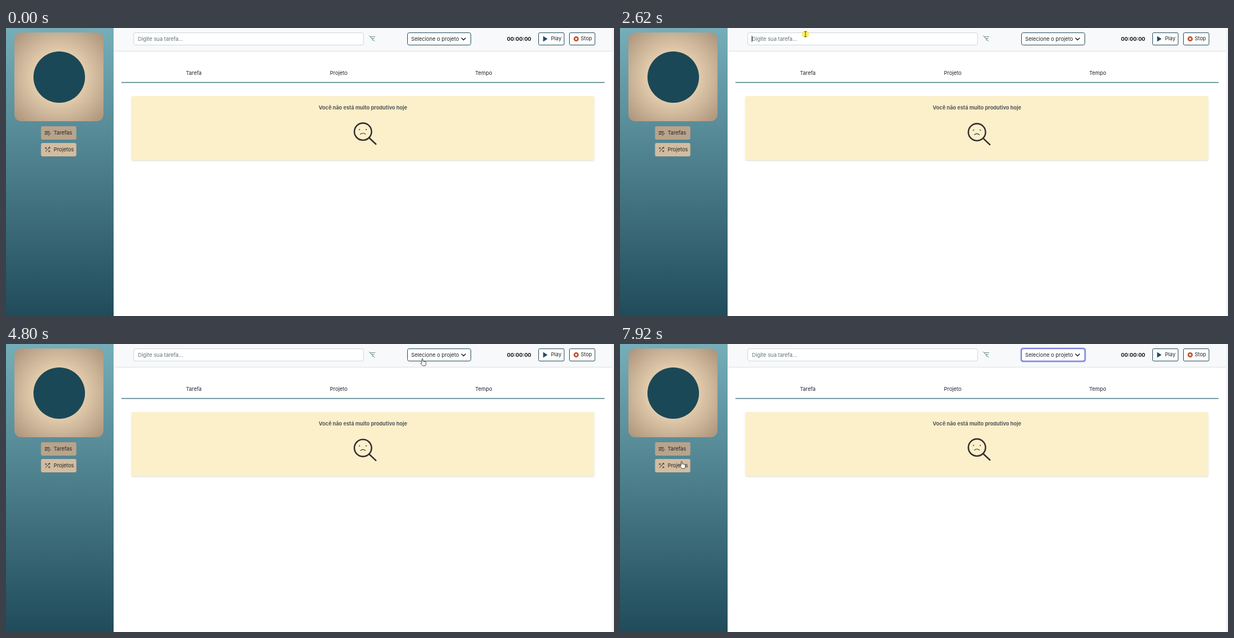
Write an HTML page that moves like this. It is 1085x516 px and loops after 7.99 s.

```html
<!DOCTYPE html>
<html lang="pt">
<head>
<meta charset="utf-8">
<style>
html, body { margin: 0; width: 100%; height: 100%; overflow: hidden; background: #fff; }
svg { display: block; width: 1085px; height: 516px; }
text { font: 9.4px Inter, sans-serif; fill: #212529; }
.mid { text-anchor: middle; }
.bold { font-size: 9.2px; font-weight: 700; }
.line { fill: none; stroke: #212529; stroke-linecap: round; stroke-linejoin: round; }
.box { fill: #fff; stroke: #1f4857; }
.ring { fill: none; stroke-width: 2.4; }
.edge { fill: none; }
#pointer path { fill: #fff; stroke: #333; stroke-width: .9; }
</style>
</head>
<body>
<svg viewBox="0 0 1085 516">
  <defs>
    <linearGradient id="sea" x2="0" y2="1">
      <stop stop-color="#75aeb9"/><stop offset="1" stop-color="#204b5b"/>
    </linearGradient>
    <radialGradient id="sand" r=".7">
      <stop offset=".3" stop-color="#ecd6b5"/><stop offset="1" stop-color="#ab937b"/>
    </radialGradient>
    <filter id="soft" x="-5%" y="-20%" width="110%" height="150%">
      <feDropShadow dx="0" dy="1" stdDeviation="1" flood-opacity=".16"/>
    </filter>
  </defs>

  <!-- page -->
  <rect x="192" width="890" height="40.5" fill="#f8f9fa" filter="url(#soft)"/>
  <rect x="1082" width="3" height="516" fill="#f1f1f2"/>
  <rect width="192" height="516" fill="url(#sea)"/>
  <rect x="15" y="8" width="159" height="159" rx="12" fill="url(#sand)"/>
  <circle cx="95" cy="88" r="46" fill="#1b4857"/>
  <rect x="206" y="96.8" width="862" height="1.6" fill="#4d8087"/>
  <rect x="223.7" y="122" width="826" height="115" rx="3" fill="#fbf0ca" filter="url(#soft)"/>
  <text class="mid bold" x="637" y="145.5" style="fill:#55565a">Você não está muito produtivo hoje</text>
  <text class="bold" x="894" y="23" style="fill:#111">00:00:00</text>
  <g id="layout"></g>

  <!-- task field -->
  <rect x="228" y="8.5" width="410" height="22" rx="3" fill="#fff" stroke="#ced4da"/>
  <g id="fieldFocus">
    <rect class="ring" x="226.5" y="7" width="413" height="25" rx="4" stroke="#c2dbfe"/>
    <rect class="edge" x="228" y="8.5" width="410" height="22" rx="3" stroke="#86b7fe"/>
  </g>
  <text x="235.5" y="23" style="fill:#5f7378">Digite sua tarefa...</text>
  <path id="caret" d="M235.5 14v11" stroke="#222"/>
  <path class="line" d="M650.5 15.5h8m-6.500 3h5m-3.500 3h2M648 14l10 10" style="stroke:#668990"/>

  <!-- project list -->
  <rect class="box" x="716.5" y="8.5" width="113" height="22" rx="3"/>
  <g id="listFocus">
    <rect class="ring" x="715.3" y="7.3" width="115.400" height="24.400" rx="4" stroke="#b4b9ff"/>
    <rect class="edge" x="716.5" y="8.5" width="113" height="22" rx="3" stroke="#4048d0"/>
  </g>
  <text x="723" y="23">Selecione o projeto</text>
  <path class="line" d="M813 18l3.500 3.500 3.500-3.500" stroke-width="1.6"/>

  <!-- icons -->
  <path d="M958.500 14.500v10l8-5z" fill="#1f4e5f"/>
  <circle cx="1017.500" cy="19.500" r="3.200" fill="#fff" stroke="#c75b33" stroke-width="3"/>
  <path class="line" d="M69.500 185.500h8m-8 2.500h8m-8 2.500h3.500m1.500 0l1.700 1.700 3.400-3.600"/>
  <path class="line" d="M71 221.500c0-3 6-4 6.500-7.500m-2 1l2-1.700 1.300 2M70 214l2.500 2.500m0-2.500L70 216.500m6 3l2.500 2.500m0-2.500L76 222"/>
  <g id="lens" class="line" style="stroke:#382f35">
    <circle cx="637" cy="185.700" r="15.300" stroke-width="2.600"/>
    <path d="M648 196.700l12 11.300" stroke-width="2.600"/>
    <path d="M632.500 190.300q4.500-3.600 9 0" stroke-width="1.100"/>
    <path d="M630.800 182h.1m11.900 0h.1" stroke-width="2"/>
  </g>

  <g id="pointer">
    <circle id="click" r="6.500" fill="#fcec3c" opacity=".8"/>
    <path id="arrow" d="M0 0v10l2.300-2 1.600 3.600 1.700-.8-1.600-3.500h3.100z"/>
    <path id="beam" d="M-2-4.500h4m-2 0v9m-2 0h4"/>
    <path id="hand" d="M-1 7V1q1-1.700 2 0v4q1.500-.8 2 .4 1.500-.5 2 .6 1.500-.2 1.500 1.200v2.300q0 2-1.300 3.500H.5Q-1.500 11-3 8.500q.4-1.500 2-.3z"/>
  </g>
</svg>
<script>
const LOOP = 7990, FADE = 150;
const CLICK = { field: 2580, away: 4080, list: 5270, again: 6540 };
const el = id => document.getElementById(id);
const clamp = v => Math.max(0, Math.min(1, v));
const show = (id, v) => el(id).setAttribute('opacity', +v);
const place = (id, x, y) => el(id).setAttribute('transform', `translate(${x} ${y})`);

const label = (s, x, y, cls = '') => `<text class="${cls}" x="${x}" y="${y}">${s}</text>`;
el('layout').innerHTML =
  ['Tarefa', 'Projeto', 'Tempo'].map((s, i) => label(s, 335 + 258.7 * i, 83.5, 'mid')).join('') +
  ['Play', 'Stop'].map((s, i) =>
    `<rect class="box" x="${950.5 + 55 * i}" y="8.5" width="45.5" height="22" rx="2"/>` +
    label(s, 972.5 + 53 * i, 22.3)).join('') +
  ['Tarefas', 'Projetos'].map((s, i) =>
    `<rect x="62.5" y="${176 + 30 * i}" width="63" height="24" rx="3" fill="${i ? '#d4bc9f' : '#b8a48b'}"/>` +
    label(s, 85, 191.4 + 30 * i)).join('');

// key points of the pointer: time, x, y
const keys = [
  [70, 1063, 502], [810, 495, 130], [1000, 675, 200], [1220, 480, 106], [1430, 533, 182],
  [1640, 540, 236], [2450, 331, 11], [2700, 331, 11], [3490, 292, 27], [4100, 487, 62],
  [4500, 833, 30], [4800, 743, 26], [5750, 765, 26], [6100, 833, 28], [6500, 753, 26],
  [6650, 753, 26], [7440, 265, 155], [7850, 110, 210]
];

function pointerAt(t) {
  const next = keys.find(k => k[0] > t) || keys.at(-1);
  const [t1, x1, y1] = next;
  const [t0, x0, y0] = keys[Math.max(0, keys.indexOf(next) - 1)];
  const k = clamp((t - t0) / (t1 - t0)), e = k * k * (3 - 2 * k);
  return [x0 + (x1 - x0) * e, y0 + (y1 - y0) * e];
}

function shapeAt(x, y) {
  const over = (l, t, w, h) => x >= l && x <= l + w && y >= t && y <= t + h;
  if (over(228, 8, 410, 23)) return 'beam';
  return over(716, 8, 114, 23) || over(63, 176, 63, 54) ? 'hand' : 'arrow';
}

function draw(t) {
  const [x, y] = pointerAt(t), shape = shapeAt(x, y);
  place('pointer', x, y);
  show('pointer', t >= 70);
  for (const s of ['arrow', 'beam', 'hand']) show(s, s === shape);
  show('click', .8 * Object.values(CLICK).some(c => t >= c && t < c + FADE));

  const since = c => clamp((t - c - 60) / FADE);
  show('fieldFocus', since(CLICK.field) - since(CLICK.away));
  show('listFocus', since(CLICK.list));
  show('caret', t >= CLICK.field && t < CLICK.away && (t - CLICK.field) % 1060 < 530);
  place('lens', 0, Math.sin(t * Math.PI / 1000));
}

const start = performance.now();
(function tick() {
  draw((performance.now() - start) % LOOP);
  requestAnimationFrame(tick);
})();
</script>
</body>
</html>
```
